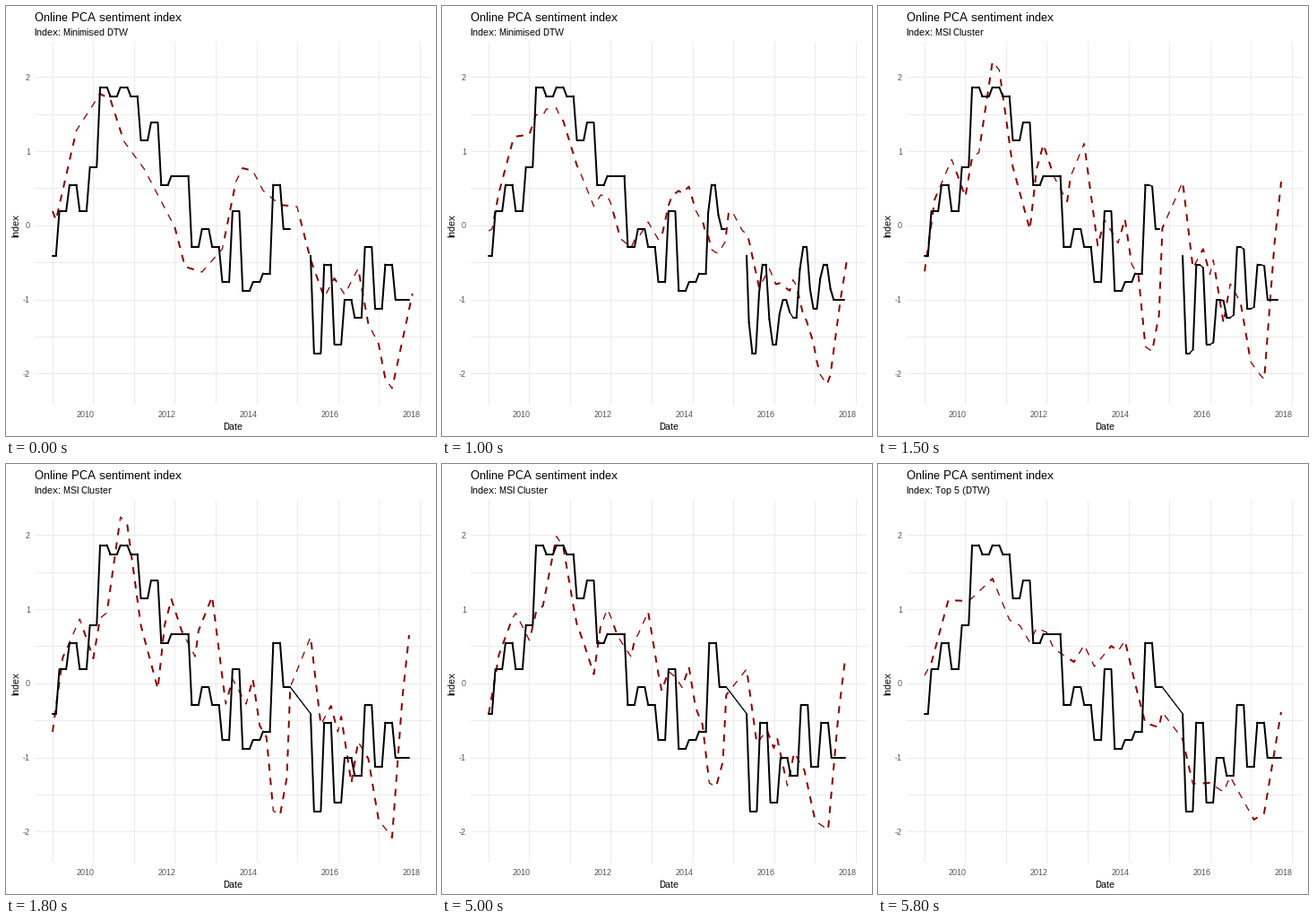
A matplotlib script that plays this animation: 480x480 px, repeating every 8000 ms.

```python
import numpy as np
import matplotlib.pyplot as plt
from matplotlib.animation import FuncAnimation
from matplotlib.collections import LineCollection

plt.rcParams.update({
    "font.family": "Liberation Sans", "toolbar": "None",
    "text.hinting": "native", "text.hinting_factor": 1, "text.kerning_factor": 6,
})

SIZE, DPI = 480, 72
FRAMES, INTERVAL, STEPS = 80, 100, 14
STARTS = (4, 44)              # last still frame before each change
GAP = (70, 76)                # months around the missing stretch
GRID, GREY, DARK_RED = "#EBEBEB", "#4D4D4D", "#8B0000"
TITLES = ["Index: Minimised DTW", "Index: MSI Cluster", "Index: Top 5 (DTW)"]


def month_x(m):
    return 52 + 3.79 * m


def curve(length, *points):
    """Monthly stage heights between (month, height) turning points."""
    return np.interp(np.arange(length), *zip(*points))


minimised = curve(
    107, (0, 229), (1, 239), (7, 139), (14, 98), (17, 104), (21, 151), (27, 182),
    (36, 247), (39, 291), (44, 297), (50, 271), (54, 196), (56, 181), (59, 184),
    (62, 206), (67, 222), (72, 224), (76, 283), (80, 325), (83, 304), (86, 322),
    (90, 293), (93, 355), (96, 377), (98, 416), (100, 427), (106, 321))
cluster = curve(
    106, (0, 299), (3, 216), (8, 173), (12, 217), (14, 172), (16, 166), (20, 59),
    (22, 68), (26, 180), (31, 251), (33, 180), (35, 151), (38, 186), (42, 215),
    (43, 186), (47, 148), (51, 268), (53, 240), (57, 268), (59, 240), (61, 292),
    (63, 305), (65, 387), (67, 392), (69, 350), (70, 249), (76, 193), (79, 291),
    (82, 270), (84, 299), (85, 282), (88, 356), (90, 310), (93, 329), (96, 397),
    (100, 417), (103, 262), (105, 191))
top_five = curve(
    106, (0, 236), (2, 222), (7, 152), (13, 153), (20, 128), (25, 174), (28, 180),
    (31, 199), (33, 183), (36, 188), (38, 206), (44, 221), (47, 202), (50, 226),
    (55, 203), (57, 209), (59, 197), (62, 245), (65, 289), (69, 294), (70, 277),
    (76, 307), (79, 357), (84, 356), (88, 366), (90, 349), (97, 397), (100, 390),
    (105, 277))

# Quarterly survey balance: each level holds three months.
early = [-3, 2, 5, 2, 7, 16, 15, 16, 15, 10, 12, 5, 6, 6,
         -2, 0, -2, -6, 2, -7, -6, -5, 5, 0]
late = [-3, -14, -4, -13, -8, -10, -2, -9, -4, -8, -8]
held = np.r_[np.repeat(early, 3)[1:], np.repeat(late, 3)[2:-1]]
months = np.arange(106)
known = (months <= GAP[0]) | (months >= GAP[1])
sentiment = 249 - 9.9 * np.interp(months, months[known], held)

# The first index has one month more, so its later rows pair one month back.
rows = np.arange(107)
paired = np.where((rows < 65) | (rows == GAP[1]), rows, rows - 1)


def ease(t):
    return 4 * t ** 3 if t < 0.5 else 1 - 4 * (1 - t) ** 3


def mix(a, b, k):
    return a + (b - a) * k


def segments(x, y):
    pts = np.column_stack([x, y])
    return list(np.stack([pts[:-1], pts[1:]], axis=1))


def dashes(x, y, on=8, off=8):
    s = np.r_[0, np.cumsum(np.hypot(np.diff(x), np.diff(y)))]
    parts = []
    for start in np.arange(0, s[-1], on + off):
        end = min(start + on, s[-1])
        at = np.r_[start, s[(s > start) & (s < end)], end]
        parts.append(np.column_stack([np.interp(at, s, x), np.interp(at, s, y)]))
    return parts


def pen_width(part):
    """Slanted strokes come out thinner than upright or level ones."""
    dx, dy = np.abs(part[-1] - part[0])
    return 1.3 if min(dx, dy) > 0.4 * max(dx, dy) else 2


def show(lines, parts):
    lines.set_segments(parts)
    lines.set_linewidths([pen_width(p) for p in parts])


fig = plt.figure(figsize=(SIZE / DPI, SIZE / DPI), dpi=DPI, facecolor="white")
ax = fig.add_axes([0, 0, 1, 1])
ax.set(xlim=(0, SIZE), ylim=(SIZE, 0))
ax.axis("off")


def label(x, y, text, size, color="black", **kw):
    return ax.text(x, y, text, fontsize=size, color=color, **kw)


def rule(x, y):
    ax.plot(x, y, color=GRID, lw=1, snap=False, solid_capstyle="butt", zorder=0)


for k in range(10):
    x = int(52.4 + 45.53 * k) + 0.5
    rule([x, x], [40, 445])
for k in range(9):
    y = int(79.9 + 41.35 * k) + 0.5
    rule([32, 474], [y, y])
for k in range(5):
    label(99 + 91 * k, 459, str(2010 + 2 * k), 9, GREY, ha="right")
    label(27, 83 + 82.75 * k, str(2 - k), 9, GREY, ha="right")

label(32, 17, "Online PCA sentiment index", 13)
label(253, 473, "Date", 11, ha="center")
label(16, 244.5, "Index", 11, ha="right", va="center", rotation=90)
subtitle = label(32, 33, TITLES[0], 11)

red = LineCollection([], colors=DARK_RED, capstyle="butt", zorder=3)
black = LineCollection([], colors="black", capstyle="round", zorder=4)
for lines in (red, black):
    ax.add_collection(lines, autolim=False)


def draw(i):
    first, second = (min(max(i - s, 0), STEPS) / STEPS for s in STARTS)
    if first < 1:
        k = ease(first)
        x = month_x(mix(rows, paired, k))
        show(red, dashes(x, mix(minimised, cluster[paired], k)))
        level = mix(sentiment[np.minimum(rows, 105)], sentiment[paired], k)
        left, right = slice(0, GAP[0] + 1), slice(GAP[1], 106)
        show(black, segments(x[left], level[left]) + segments(x[right], level[right]))
    else:
        x = month_x(months)
        show(red, dashes(x, mix(cluster, top_five, ease(second))))
        show(black, segments(x, sentiment))
    subtitle.set_text(TITLES[(first >= 0.5) + (second >= 0.5)])
    return red, black, subtitle


anim = FuncAnimation(fig, draw, frames=FRAMES, interval=INTERVAL,
                     repeat=True, repeat_delay=0, blit=False)
plt.show()
```
